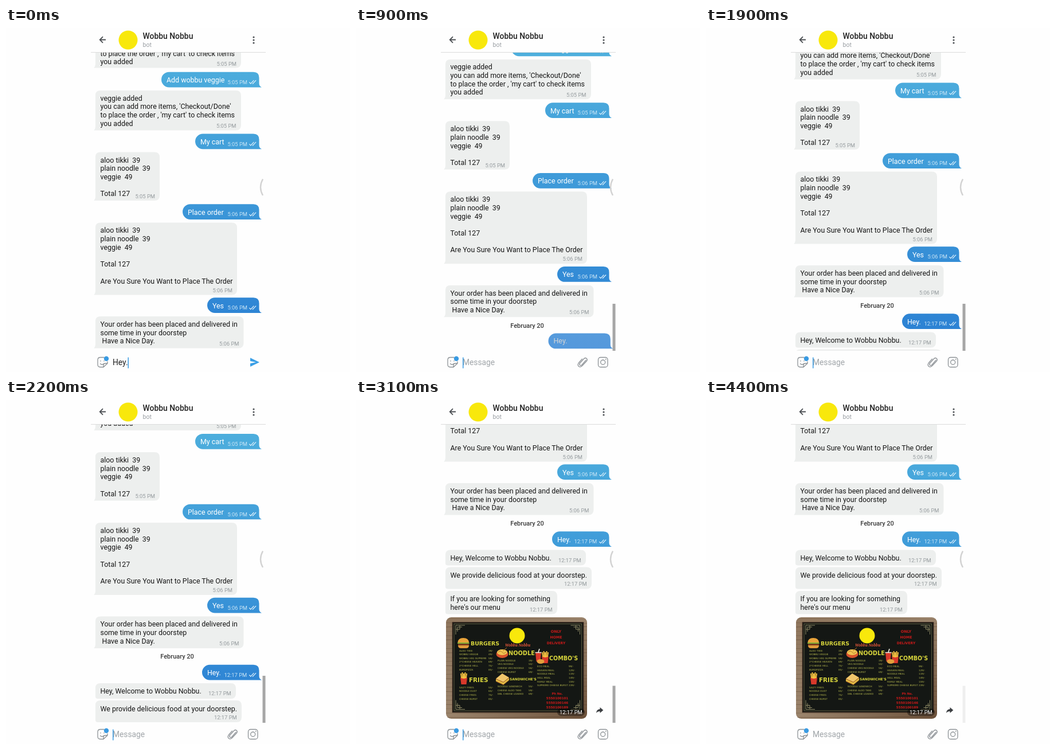
An HTML page for the animation above (4.5 s loop, 600 by 600 pixels).

```html
<!DOCTYPE html>
<html lang="en">
<head>
<meta charset="utf-8">
<title>Food order chat</title>
<style>
html, body { margin: 0; width: 100%; height: 100%; overflow: hidden; background: #fefefe; }
svg { display: block; width: 100vw; height: 100vh; font-family: Roboto, Arial, sans-serif; }
text { white-space: pre; }
.msg { font-size: 12.4px; fill: #161616; }
.out .msg { fill: #fff; }
.time { font-size: 9.4px; fill: #959b9e; }
.out .time { fill: #c9e5f6; }
.field { font-size: 13.8px; }
.line { fill: none; stroke: #8d9296; stroke-width: 1.3; stroke-linecap: round; stroke-linejoin: round; }
.board { font-family: "DejaVu Sans", sans-serif; }
.head { font-weight: 700; fill: #d6d43c; }
.item { font-size: 4.2px; fill: #b0b34c; }
.red { font-weight: 700; fill: #cc1a1a; text-anchor: middle; }
</style>
</head>
<body>
<svg viewBox="0 0 600 600">
  <defs>
    <linearGradient id="blue" gradientUnits="userSpaceOnUse" x1="0" y1="43" x2="0" y2="563">
      <stop offset="0" stop-color="#4eafdd"/><stop offset="1" stop-color="#2a7fd3"/>
    </linearGradient>
    <linearGradient id="scrollBlue" href="#blue"/>
    <linearGradient id="wood" x1="0" y1="0" x2="1" y2="1">
      <stop offset="0" stop-color="#8f765d"/><stop offset=".5" stop-color="#9a836b"/><stop offset="1" stop-color="#6d523b"/>
    </linearGradient>
    <clipPath id="view"><rect x="148" y="43" width="305" height="520"/></clipPath>
    <clipPath id="panel"><rect x="148" y="0" width="305" height="600"/></clipPath>
    <clipPath id="photo"><rect x="157" y="379" width="246" height="177" rx="9"/></clipPath>
  </defs>
  <g clip-path="url(#view)"><g id="chat"></g></g>
  <rect id="bar" x="447.5" width="5" fill="#a6a6a6"/>
  <path d="M448 263.5 Q440 278 448 292" fill="none" stroke="#d2d2d2" stroke-width="2.4"/>

  <path d="M148 42.5 H453" stroke="#dcdcdc"/>
  <path d="M174 20.5 H164 M169 15.2 L163.7 20.5 L169 25.8" fill="none" stroke="#4c5054" stroke-width="1.8"/>
  <circle cx="213" cy="21" r="16.5" fill="#f8e80c"/>
  <text x="238.5" y="18.8" font-size="13.9" font-weight="500" fill="#222">Wobbu Nobbu</text>
  <text x="238.5" y="33.2" font-size="10.5" fill="#9a9fa3">bot</text>
  <g fill="#4c5054"><circle cx="432" cy="16" r="1.6"/><circle cx="432" cy="21" r="1.6"/><circle cx="432" cy="26" r="1.6"/></g>

  <g class="line">
    <path d="M171 574.5 H164.5 Q160 574.5 160 579 V587 Q160 591.5 164.5 591.5 H170 L177 585 V582 M170 591 V588 Q170 585 173 585 H176.5"/>
    <path d="M164.5 585.5 Q167.5 588.5 170.5 585.5 M165 580.3 V581 M171 580.3 V581"/>
  </g>
  <circle cx="175" cy="576.8" r="4.2" fill="#3a9be2"/>
  <text id="typed" class="field" x="186" y="588.3" fill="#222">Hey.</text>
  <text id="hint" class="field" x="186" y="588.3" fill="#a1a6aa">Message</text>
  <rect id="caret" y="574.5" width="1.5" height="19" fill="#3a9be2"/>
  <g id="tools" class="line">
    <path d="M401 579.5 L394 587.5 Q391.8 589.5 390.3 587.8 Q389 586.3 390.6 584.5 L397.6 576.8 Q400 574.5 402.2 576.4 Q404.3 578.6 402.2 581 L394.5 589.3 Q391 592.6 388.3 590 Q385.8 587.3 388.6 583.8 L394.5 577.3"/>
    <rect x="422.5" y="574.5" width="16.5" height="17" rx="4"/><circle cx="430.7" cy="583" r="4"/>
    <circle cx="435.7" cy="577.7" r=".4"/>
  </g>
  <path id="send" d="M426 575.3 L442 583 L426 590.7 V585 L436 583 L426 581 Z" fill="#3a9fe6"/>
  <g id="fly" clip-path="url(#panel)"><path id="flyBox" fill="url(#blue)"/><text id="flyText">Hey.</text></g>
</svg>
<script>
const LOOP = 4500, STEP = 100, LINE = 14.7;
const $ = id => document.getElementById(id);
const clamp = v => Math.max(0, Math.min(1, v));
const lerp = (a, b, p) => a + (b - a) * p;
const ramp = (t, a, b) => clamp((t - a) / (b - a));
const easeOut = p => 1 - (1 - p) * (1 - p);
const easeBoth = p => p < .5 ? 4 * p ** 3 : 1 - 4 * (1 - p) ** 3;

const text = (cls, x, y, s, more = '') => `<text class="${cls}" x="${x}" y="${y}" ${more}>${s}</text>`;

function outPath(left, top, bottom, right = 441.5) {
  const r = (bottom - top) / 2;
  return `M${left + r} ${top} H${right - 10} Q${right} ${top} ${right} ${top + 10} V${bottom - 7}
    Q${right} ${bottom - 2} ${right + 4.5} ${bottom} H${left + r} A${r} ${r} 0 0 1 ${left + r} ${top} Z`;
}

function inPath(right, top, bottom, tail) {
  const foot = tail
    ? `H153 Q156 ${bottom - 2} 156 ${bottom - 8}`
    : `H160 Q156 ${bottom} 156 ${bottom - 4}`;
  return `M165 ${top} H${right - 9} Q${right} ${top} ${right} ${top + 9} V${bottom - 9}
    Q${right} ${bottom} ${right - 9} ${bottom} ${foot} V${top + 8} Q156 ${top} 165 ${top} Z`;
}

function sent(left, top, s, time, timeX, id = '') {
  const y = top + 19.8;
  return `<g class="out" id="${id}"><path d="${outPath(left, top, top + 26.7)}" fill="url(#scrollBlue)"/>
    ${text('msg', left + 9, top + 18.3, s)}${text('time', timeX, y + 1.2, time)}
    <path d="M424.3 ${y - 2} l2.5 2.6 5.6-6 M429.8 ${y + .1} l.6 .5 5.7-6" fill="none" stroke="#e4f3fc" stroke-width="1.2"/></g>`;
}

function got(right, top, bottom, lines, first, time, timeX, timeY, tail = true, id = '') {
  return `<path id="${id}" d="${inPath(right, top, bottom, tail)}" fill="#edefee"/>` +
    lines.map((s, i) => s && text('msg', 164.5, first + i * LINE, s)).join('') +
    text('time', timeX, timeY, time);
}

const heads = [
  [200, 427.5, 9.4, 'BURGERS'], [266, 444.6, 9.8, 'NOODLE'], [337, 453.8, 9.6, "COMBO'S"],
  [197, 491.6, 10.4, 'FRIES'], [268, 488.5, 5.9, "SANDWICHE'S"]
];
// x, price x, first baseline, rows
const lists = [
  [180, 231, 438.6, 'ALOO TIKKI|39;WOBBU VEGGIE|49;WOBBU VEG SUPREME|59;2*CHEESE HEAVEN|69;2*CHEESE HELL|75;BURGPIZZA|85'],
  [247, 301, 455.8, 'PLAIN NOODLE|39;VEG NOODLE|50;CHEESE VEG NOODLE|56;CHEESE BURST|69'],
  [316, 371, 466.2, 'ECO MEAL|99;HEAVEN MEAL|129;NOODLE MEAL|119;HELL MEAL|149;FAMILY MEAL|159;SUPREME CHEESE BURST|239'],
  [180, 231, 502.8, 'SALTY FRIES|55;NOODLE DUST|65;CHEESE FRIES|75;CHEESE BURST|85'],
  [247, 301, 501.2, 'NOODLE SANDWICH|55;CHEESE ALOO TIKKI|59;DBL CHEESE LOADED|69']
];
const reds = [
  [349, 406.3, 6.4, 'ONLY'], [349, 416.3, 6.2, 'HOME'], [349, 426, 6, 'DELIVERY'], [351, 514, 5.2, 'Ph No.'],
  [351, 522, 5.5, '5550100101'], [351, 530, 5.5, '5550100146'], [351, 538, 5.5, '5550100189']
];

function fries(x, y) {
  const sticks = [-5, -2.5, 0, 2.5, 5].map((d, i) =>
    `<path d="M${x + d * .7} ${y + 2} L${x + d} ${y - 9 - i % 2 * 2}" stroke="#f3c040" stroke-width="2"/>`).join('');
  return sticks + `<path d="M${x - 6} ${y - 2} Q${x} ${y + 2} ${x + 6} ${y - 2} L${x + 4.5} ${y + 10} H${x - 4.5} Z" fill="#d8392b"/>`;
}

function food() {
  return `<path d="M177.5 423 Q178 415 187 415 Q196.5 415 197 423 Z" fill="#e9a33a"/>
    <path d="M177 424 H197.5" stroke="#7fae35" stroke-width="2"/><path d="M178 426.5 H197" stroke="#7a3c1d" stroke-width="3"/>
    <path d="M178 428 H197 Q197 433 192 433 H183 Q178 433 178 428 Z" fill="#e2993a"/>
    <ellipse cx="255" cy="443" rx="10.5" ry="7" fill="#d9532c"/><ellipse cx="255" cy="440" rx="9" ry="5" fill="#f0c553"/>
    <path d="M248 440 Q252 436 255 440 T262 439 M256 438 L263 432" fill="none" stroke="#b97a25"/>
    <path d="M313 441 H323 L321.5 456 H314.5 Z" fill="#d8392b"/><path d="M312.5 440.5 H323.5 M318 440 L320 434" stroke="#f2efe4" stroke-width="1.6"/>
    ${fries(330, 449)}<ellipse cx="322" cy="456" rx="6.5" ry="4" fill="#e2a03d"/>
    ${fries(188, 486)}
    <path d="M244 486 L255 477 L267 484 L257 492 Z" fill="#f0c66b"/><path d="M244 486 L257 492 L267 484 V489 L257 497 L244 491 Z" fill="#c9822f"/>
    <path d="M244 488.5 L257 494.5 L267 486.5" fill="none" stroke="#e8d44f" stroke-width="1.5"/>`;
}

function menuBoard() {
  let grain = '';
  for (let i = 0; i < 24; i++) {
    const y = 381 + i * 7.5;
    grain += `<path d="M157 ${y} q60 ${3 * Math.sin(i * 2.3)} 123 0 t123 ${2 * Math.cos(i)}" stroke="#4f3826" stroke-opacity="${.15 + .12 * (i % 3)}" fill="none"/>`;
  }
  const corner = (x, y, sx, sy) =>
    `<path transform="translate(${x} ${y}) scale(${sx} ${sy})" d="M0 16 V0 H16 M3 11 V3 H11 M0 7 H7 V0" fill="none" stroke="#8d8964"/>`;
  const rows = lists.map(([x, px, y, data]) => data.split(';').map((row, i) => {
    const [name, price] = row.split('|');
    return text('item', x, y + i * 6.6, name) + text('item', px, y + i * 6.6, price + '/-');
  }).join('')).join('');
  return `<g transform="translate(0 358)"><g clip-path="url(#photo)">
    <rect x="157" y="379" width="246" height="177" fill="url(#wood)"/>${grain}
    <rect x="168.5" y="388" width="228" height="156.5" fill="#141714" stroke="#2c2018" stroke-width="1.5"/>
    <rect x="171" y="390.5" width="222.5" height="151.5" fill="none" stroke="#6f6d4a" stroke-width=".8"/>
    ${corner(174, 393, 1, 1)}${corner(390.5, 393, -1, 1)}${corner(174, 539.5, 1, -1)}${corner(390.5, 539.5, -1, -1)}
    <g class="board">${heads.map(([x, y, size, s]) => text('head', x, y, s, `font-size="${size}"`)).join('')}
    ${rows}${reds.map(([x, y, size, s]) => text('red', x, y, s, `font-size="${size}"`)).join('')}</g>
    <circle cx="281" cy="411" r="13.5" fill="#f8e80c"/>
    <text x="282" y="430" font-size="6.2" font-style="italic" font-weight="700" font-family="Noto Serif, serif" text-anchor="middle" fill="#e5573a">Wobbu Nobbu</text>
    ${food()}
    <rect x="351" y="538" width="48" height="13" rx="6.5" fill="#000" fill-opacity=".4"/>
    ${text('time', 355, 548.2, '12:17 PM', 'style="fill:#fff"')}</g>
    <path d="M425.5 536 L431.3 541 L425.5 546 V543 Q421 543 419 546 Q419.5 539.5 425.5 539 Z" fill="#3c3f42"/></g>`;
}

const help = ["you can add more items, 'Checkout/Done'", "to place the order , 'my cart' to check items", 'you added'];
const cart = ['aloo tikki  39', 'plain noodle  39', 'veggie  49', '', 'Total 127'];

$('chat').innerHTML = [
  got(410, 0, 69.5, help, 33.8, '5:05 PM', 367.5, 66.3),
  sent(271, 76.7, 'Add wobbu veggie', '5:05 PM', 386.5),
  got(410, 109, 178.5, ['veggie added', ...help], 126.6, '5:05 PM', 367, 174.3),
  sent(330, 184.5, 'My cart', '5:05 PM', 386.5),
  got(268, 216.5, 301, cart, 234.6, '5:05 PM', 225.5, 297),
  sent(308, 307.2, 'Place order', '5:06 PM', 386.5),
  got(403, 339.5, 465.5, [...cart, '', 'Are You Sure You Want to Place The Order'], 357.4, '5:06 PM', 360.5, 460.5),
  sent(351, 470.3, 'Yes', '5:06 PM', 386.5),
  got(414.5, 503, 558.5, ['Your order has been placed and delivered in', 'some time in your doorstep', ' Have a Nice Day.'], 521, '5:06 PM', 372, 553.5),
  text('', 298.5, 577, 'February 20', 'font-size="11" font-weight="500" fill="#3a3a3a" text-anchor="middle"'),
  sent(342, 587.3, 'Hey.', '12:17 PM', 380.5, 'hey'),
  got(401, 619.5, 646.5, ['Hey, Welcome to Wobbu Nobbu.'], 637.8, '12:17 PM', 353, 641, false),
  got(411, 649.5, 687.5, ['We provide delicious food at your doorstep.'], 668.2, '12:17 PM', 363, 682.3, false),
  got(351, 691, 731.5, ['If you are looking for something', "here's our menu"], 709, '12:17 PM', 303, 727.3, true, 'ask'),
  menuBoard()
].join('');

// start, duration, distance
const scrolls = [[500, 500, 56], [1600, 300, 33], [1990, 300, 41], [2300, 300, 44], [2750, 300, 184]];
const show = (id, alpha) => $(id).setAttribute('opacity', alpha);
const set = (id, attrs) => Object.entries(attrs).forEach(([k, v]) => $(id).setAttribute(k, v));

function drawFlight(t) {
  const p = ramp(t, 500, 1000), rise = easeBoth(p);
  const left = lerp(178, 342, easeOut(p)), top = lerp(572.2, 531.3, rise);
  const ink = Math.round(lerp(50, 255, p));
  show('hey', p === 1 ? 1 : 0);
  show('fly', p > 0 && p < 1 ? 1 : 0);
  set('flyBox', { d: outPath(left, top, top + 26.7, lerp(453, 441.5, p)), opacity: p });
  set('flyText', {
    x: left + 9, y: top + lerp(16.2, 18.3, p),
    'font-size': lerp(13, 12.4, p), fill: `rgb(${ink},${ink},${ink})`
  });
}

function draw(t) {
  const shift = scrolls.reduce((sum, [a, d, px]) => sum + px * easeBoth(ramp(t, a, a + d)), 0);
  set('chat', { transform: `translate(0 ${-shift})` });
  set('scrollBlue', { gradientTransform: `translate(0 ${shift})` });
  set('ask', { d: inPath(351, 691, 731.5, t < 2800) });
  drawFlight(t);

  const typing = t <= 500;
  show('typed', typing ? 1 : 0);
  show('hint', ramp(t, 600, 800));
  show('tools', ramp(t, 600, 800));
  show('send', 1 - ramp(t, 600, 750));
  set('send', { transform: `translate(${6 * ramp(t, 500, 600)} 0)` });
  set('caret', { x: typing ? 212.5 : 186, opacity: (t + 200) % 1000 < 500 ? 1 : 0 });

  const barTop = lerp(481, 498.5, ramp(t, 2750, 3050));
  set('bar', { y: barTop, height: 563 - barTop, opacity: t < 550 ? 0 : 1 - ramp(t, 3900, 4500) });
}

const start = performance.now();
function tick() {
  const t = (performance.now() - start) % LOOP;
  draw(Math.floor(t / STEP) * STEP);
  requestAnimationFrame(tick);
}
draw(0);
requestAnimationFrame(tick);
</script>
</body>
</html>
```
